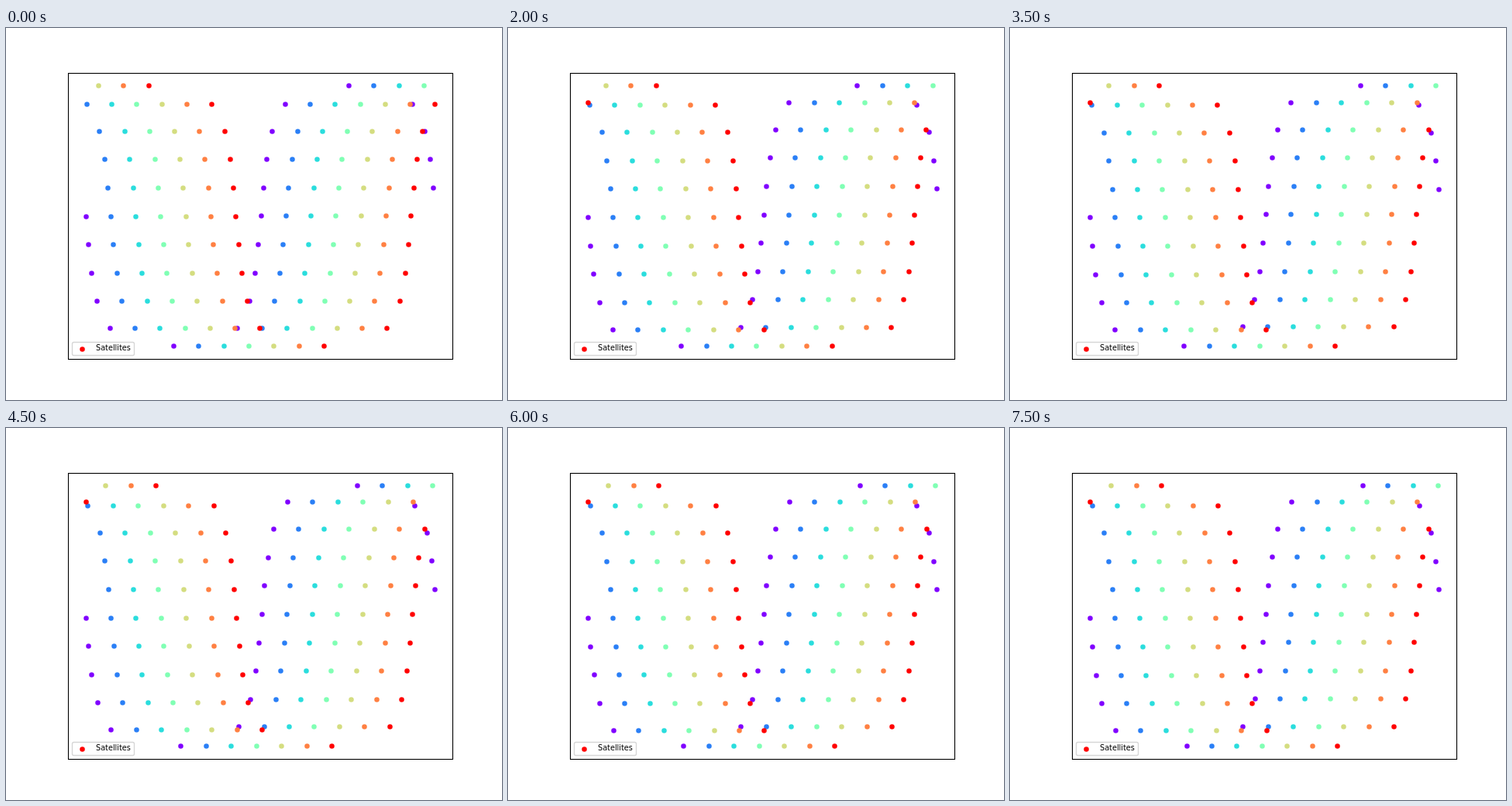
These frames come from a looping animation (640 px wide and 480 px high, 8 s). An HTML page:

```html
<!DOCTYPE html>
<html lang="en">
<head>
<meta charset="utf-8">
<title>Satellite constellation</title>
<style>
  html, body { margin: 0; width: 100%; height: 100%; overflow: hidden; background: #fff; }
  svg { display: block; }
  text { font: 9.72px "DejaVu Sans", sans-serif; }
</style>
</head>
<body>
<svg width="640" height="480" viewBox="0 0 640 480">
  <g id="dots"></g>
  <rect x="80.5" y="58.5" width="496" height="369" fill="none" stroke="#000" stroke-width="1.11"/>
  <rect x="85.5" y="405.5" width="80" height="17" rx="2" fill="#fff" fill-opacity=".8"
        stroke="#ccc" stroke-opacity=".8" stroke-width="1.39"/>
  <circle cx="98.5" cy="414.5" r="3.24" fill="#f00"/>
  <text x="116" y="416">Satellites</text>
</svg>
<script>
const COLORS = ['#8000ff', '#2a7ff6', '#2adddd', '#80ffb4', '#d4dd80', '#ff8042', '#ff0000'];
const PER_PLANE = 20, STEP = 500;
const RAD = Math.PI / 180, INCLINATION = 81.4 * RAD;
// Data area inside the axes, after the 5% margins
const LEFT = 102.55, WIDTH = 450.9, TOP = 74.4, HEIGHT = 336;
// Orbital phase in degrees, one value per step
const PHASES = [.06, .11, .66, .79, .84, .89, .945, 1.01,
                1.07, 1.14, 1.18, 1.22, 1.26, 1.3, 1.345, 1.39];

const group = document.getElementById('dots');
const dots = COLORS.flatMap((color, plane) =>
  Array.from({ length: PER_PLANE }, (_, slot) => {
    const el = document.createElementNS('http://www.w3.org/2000/svg', 'circle');
    el.setAttribute('r', 3.24);
    el.setAttribute('fill', color);
    group.append(el);
    return { el, node: plane * 180 / COLORS.length, slot: slot * 360 / PER_PLANE };
  }));

const wrap = deg => ((deg + 180) % 360 + 360) % 360 - 180;

// Point below a satellite: longitude and latitude in degrees
function groundPoint({ node, slot }, phase) {
  const u = (slot + phase) * RAD;
  const lon = Math.atan2(Math.cos(INCLINATION) * Math.sin(u), Math.cos(u)) / RAD;
  const lat = Math.asin(Math.sin(INCLINATION) * Math.sin(u)) / RAD;
  return [wrap(node + lon), lat];
}

// Linear scale fitted to the values, snapped to pixel centres
function fit(values, start, size) {
  const min = Math.min(...values), span = Math.max(...values) - min;
  return v => Math.round(start + (v - min) / span * size) + .5;
}

function draw(phase) {
  const points = dots.map(dot => groundPoint(dot, phase));
  const x = fit(points.map(p => p[0]), LEFT, WIDTH);
  const y = fit(points.map(p => -p[1]), TOP, HEIGHT);
  dots.forEach(({ el }, i) => {
    el.setAttribute('cx', x(points[i][0]));
    el.setAttribute('cy', y(-points[i][1]));
  });
}

let start, shown;
function tick(now) {
  start ??= now;
  const step = Math.floor((now - start) / STEP) % PHASES.length;
  if (step !== shown) draw(PHASES[shown = step]);
  requestAnimationFrame(tick);
}
draw(PHASES[0]);
requestAnimationFrame(tick);
</script>
</body>
</html>
```
